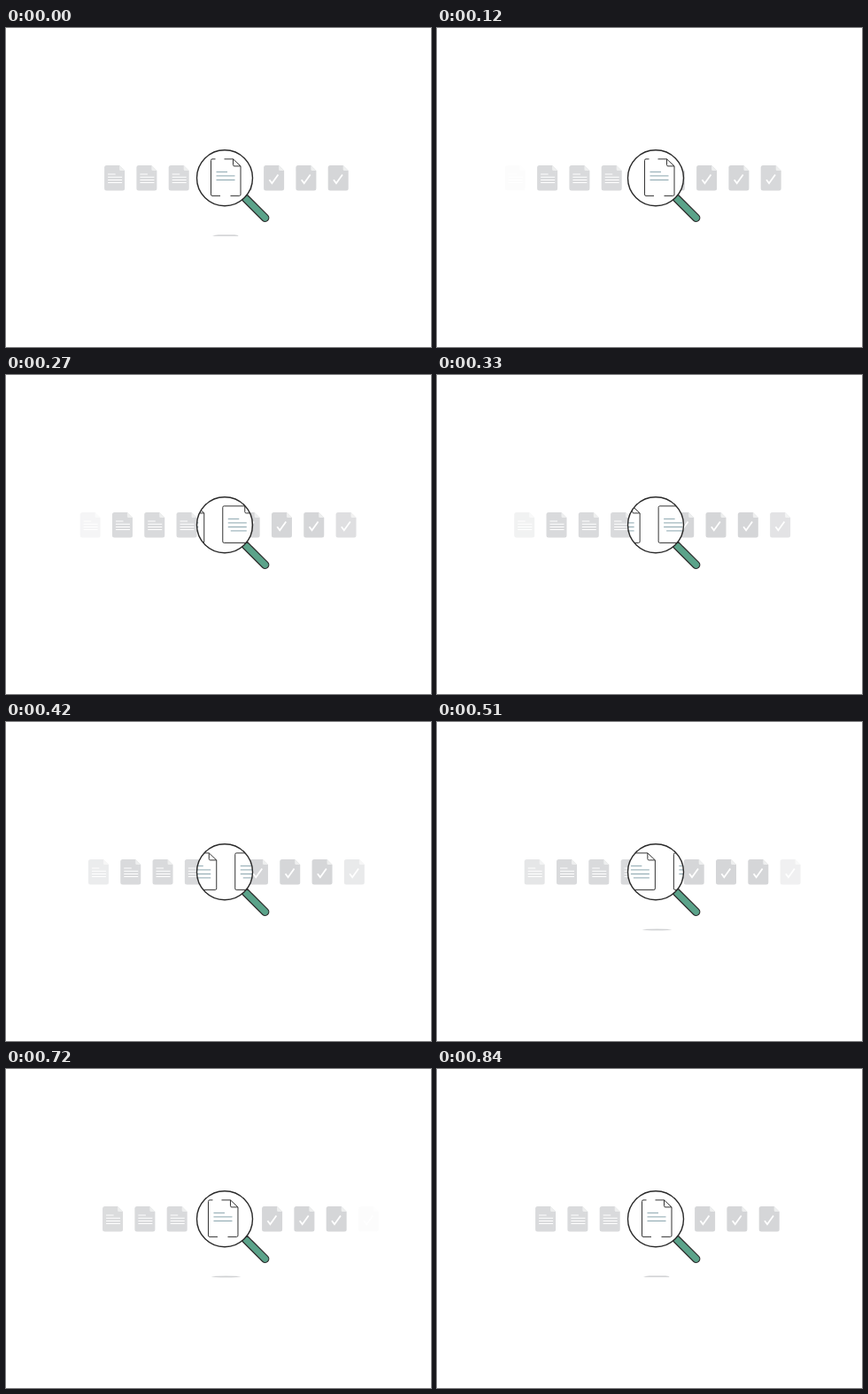
Animation of 480x360 px, one loop 900 ms. Source, as an HTML page:

```html
<!DOCTYPE html>
<html lang="en">
<head>
<meta charset="utf-8">
<title>Document scan</title>
<style>
  html, body { margin: 0; width: 100%; height: 100%; overflow: hidden; background: #fff; }
  svg { display: block; width: 100%; height: 100%; }
</style>
</head>
<body>
<svg viewBox="0 0 480 360" fill="none">
  <defs>
    <g id="card">
      <path d="M2.5 0H17L23 6V26Q23 28.5 20.5 28.5H2.5Q0 28.5 0 26V2.5Q0 0 2.5 0Z"/>
      <path d="M17 0V4.5Q17 6 18.5 6H23Z" fill="#eeefef"/>
    </g>
    <g id="textCard">
      <use href="#card" fill="#d9dadc"/>
      <path d="M4 10H12.5M4 13.3H20M4 16.5H20M4 19.5H20" stroke="#fff"/>
    </g>
    <g id="checkCard">
      <use href="#card" fill="#d5d6d8"/>
      <path d="M6.3 16.2L9.3 20.2L16.3 10.5" stroke="#fff" stroke-width="1.8"/>
    </g>
    <g id="sheetText" stroke="#8aa5ae">
      <path d="M6 14.5H18.5M6 19H27M6 23.6H27"/>
    </g>
    <g id="sheetFold" stroke="#333">
      <path d="M25 0V6.5Q25 8 26.5 8H33.5"/>
    </g>
    <clipPath id="lensClip"><circle cx="247" cy="169.2" r="31.5"/></clipPath>
  </defs>

  <g id="textRow"></g>
  <g id="checkRow"></g>

  <path d="M266.5 194L289.8 217.2A4.1 4.1 0 0 0 295.6 211.4L272.3 188.2Z"
        fill="#5ba38a" stroke="#2b2b2b" stroke-width="1.2"/>
  <circle cx="247" cy="169.2" r="31.5" fill="#fff"/>
  <g clip-path="url(#lensClip)"><g id="sheets"></g></g>
  <circle cx="247" cy="169.2" r="31.5" stroke="#2b2b2b" stroke-width="1.4"/>

  <ellipse id="shadow" cx="248.5" cy="234.3" rx="16.5" ry=".9" fill="#d0d1d3"/>
  <path id="cap" d="M233 235Q236 233.3 240 233.3H258Q262 233.3 262.5 235Z" fill="#d5d6d8"/>
</svg>
<script>
const LOOP = 900, TRAVEL = 840, STEP = 30;
const SMALL_GAP = 36.3, LARGE_GAP = 54.5;
const WHOLE = 'M1.5 0H25L33.5 8V40Q33.5 41.5 32 41.5H1.5Q0 41.5 0 40V1.5Q0 0 1.5 0Z';
const BROKEN = 'M5 0H1.5Q0 0 0 1.5V40Q0 41.5 1.5 41.5H10.5M22 41.5H32Q33.5 41.5 33.5 40V8L25 0H15';
const el = id => document.getElementById(id);
const textRow = el('textRow'), checkRow = el('checkRow'), sheets = el('sheets');

const row = (symbol, x) => [0, 1, 2, 3].map(i =>
  `<use href="#${symbol}" x="${x + i * SMALL_GAP}" y="155"/>`).join('');
textRow.innerHTML = row('textCard', 74.8);
checkRow.innerHTML = row('checkCard', 254.8);
sheets.innerHTML = [231.5 - LARGE_GAP, 231.5].map(x =>
  `<g transform="translate(${x} 147.9)">
    <path class="outline" stroke="#333"/>
    <use href="#sheetText"/><use href="#sheetFold"/>
    <path class="lastLine" d="M9 28H27" stroke="#8aa5ae"/>
  </g>`).join('');
const outlines = document.querySelectorAll('.outline');
const lastLines = document.querySelectorAll('.lastLine');

const slide = (node, dx) => node.setAttribute('transform', `translate(${dx} 0)`);
const show = (node, visible) => node.setAttribute('opacity', visible ? 1 : 0);

function draw() {
  const time = Math.floor(performance.now() % LOOP / STEP) * STEP;
  const u = Math.min(time / TRAVEL, 1);
  const p = u * u * (3 - 2 * u);
  const resting = p === 0 || p === 1;

  slide(textRow, p * SMALL_GAP);
  slide(checkRow, p * SMALL_GAP);
  slide(sheets, p * LARGE_GAP);
  textRow.firstChild.setAttribute('opacity', p);
  checkRow.lastChild.setAttribute('opacity', 1 - p);

  const centred = p < 0.1 || p > 0.8;
  outlines.forEach(o => o.setAttribute('d', centred ? BROKEN : WHOLE));
  lastLines.forEach(l => show(l, !centred));
  show(el('shadow'), time >= 480 && !resting);
  show(el('cap'), resting);
  requestAnimationFrame(draw);
}
draw();
</script>
</body>
</html>
```
